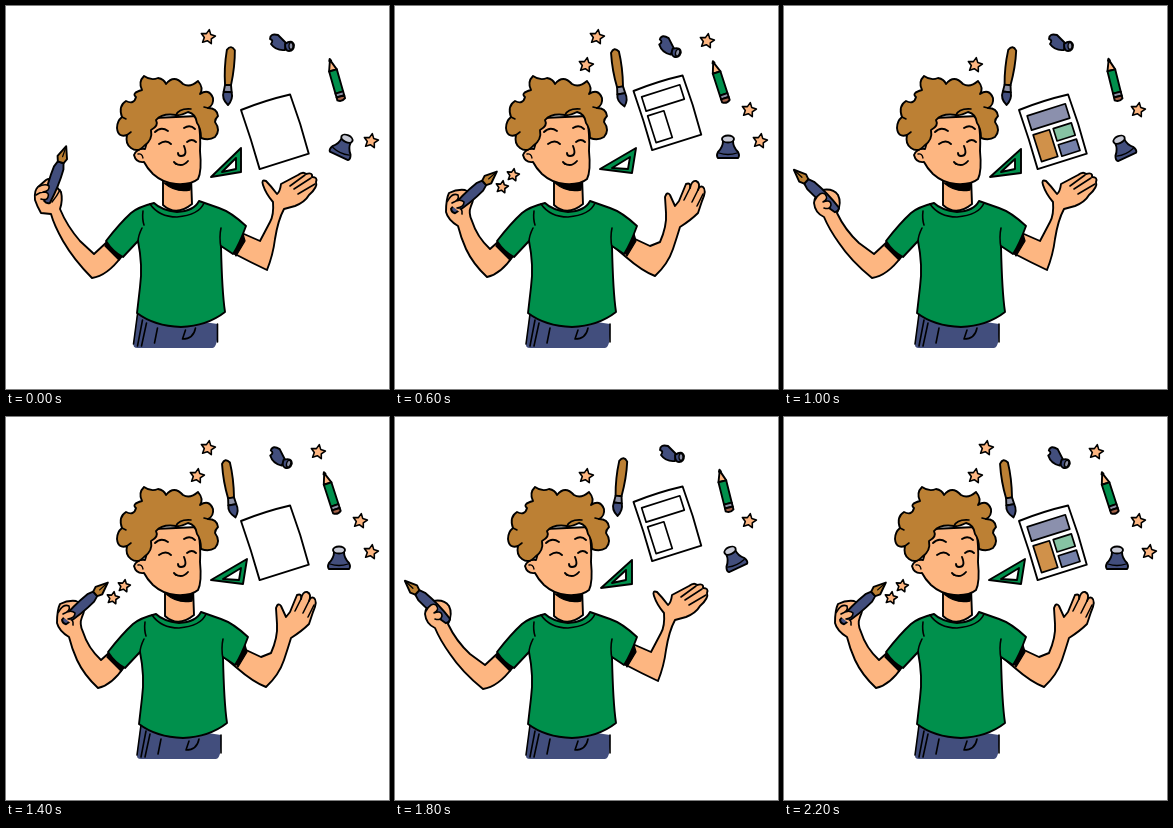
Write an HTML page that moves like this. It is 383 by 383 pixels and loops after 2.4 s.

```html
<!DOCTYPE html>
<html lang="en">
<head>
<meta charset="utf-8">
<title>Illustrator juggling tools</title>
<style>
html, body { margin: 0; width: 100%; height: 100%; overflow: hidden; background: #fff; }
svg { display: block; width: 100vw; height: 100vh; }
</style>
</head>
<body>
<svg id="stage" viewBox="0 0 383 383" stroke="#000" stroke-width="1.9" stroke-linejoin="round" stroke-linecap="round"></svg>
<script>
(() => {
const SKIN = '#fdb681', HAIR = '#bc8034', GREEN = '#00904c', NAVY = '#424e7d', GREY = '#8d90a4';
const STEP = 200, STEPS = 12;
const stage = document.getElementById('stage');

const shape = (d, fill = 'none', extra = '') => `<path d="${d}" fill="${fill}" ${extra}/>`;
const group = (x, y, angle, content) => `<g transform="translate(${x} ${y}) rotate(${angle})">${content}</g>`;
const thin = 'stroke-width="1.3"', fine = 'stroke-width="1.6"';

function star([x, y], r = 7.5, turn = 10) {
  let d = '';
  for (let i = 0; i < 10; i++) {
    const a = (turn - 90 + i * 36) * Math.PI / 180, q = i % 2 ? r * .5 : r;
    d += (i ? 'L' : 'M') + (x + q * Math.cos(a)).toFixed(1) + ' ' + (y + q * Math.sin(a)).toFixed(1);
  }
  return shape(d + 'Z', SKIN, fine);
}

// Left arms with the fist, and the fingers that lie over the pen
const upright = {
  arm: 'M118 250Q103 270 88 272Q70 254 59 235Q50 219 47 208L37 207Q33 200 31 194Q30 184 34 181L42 174Q47 171 49 177L57 186Q59 194 56 203Q63 220 76 235L90 248L104 235Z',
  pen: [43, 196, -71],
  fingers: 'M34 181Q41 177 45 180Q46 185 39 186Q46 186 44 191Q43 195 37 193M32 189Q36 186 40 186M56 184Q53 190 48 196'
};
const leftArms = {
  flat: upright,
  laugh: upright,
  out: {
    arm: 'M118 250Q103 270 88 272Q67 255 55 237Q45 223 40 211Q31 207 30 197Q31 188 38 184Q49 182 54 189Q58 197 53 207Q61 224 75 237L90 248L104 235Z',
    pen: [53, 204, -137],
    fingers: 'M31 194Q36 185 41 188Q45 193 39 196Q47 193 47 199Q46 204 40 202'
  },
  up: {
    arm: 'M118 250Q106 268 92 271Q78 258 71 243Q66 232 63 220Q53 214 51 206Q51 193 54 187Q62 183 70 184L76 187Q80 192 76 200Q73 207 77 215Q82 231 95 243L104 235Z',
    pen: [58, 205, -42],
    fingers: 'M52 196Q57 186 63 189Q65 194 57 197Q65 192 69 196Q69 201 62 202Q68 202 67 208'
  }
};

const rightArms = {
  flat: {
    arm: 'M218 238L229 247Q246 256 263 264Q269 249 271 233Q274 214 280 203L291 200Q301 196 305 189Q314 181 312 176Q314 171 308 171Q309 166 302 168Q299 165 294 169L277 178Q276 186 273 188Q267 180 262 175Q257 173 259 179Q262 188 269 196Q270 209 266 216L256 235L240 228Z',
    lines: 'M307 172L290 183M301 169L286 180M311 178L294 188'
  },
  laugh: {
    arm: 'M218 240L229 250Q243 267 257 274Q272 259 283 243Q295 228 301 218Q309 213 311 205L315 187Q313 182 309 188L306 197Q308 185 304 184Q300 183 299 196Q298 188 294 190Q291 193 292 203L289 192Q286 190 285 195L284 208Q286 214 279 220L257 246L241 233Z',
    lines: 'M306 197L304 203M299 196L300 203M292 202Q291 207 287 210'
  },
  up: {
    arm: 'M218 240L231 251Q247 265 260 270Q273 258 278 243Q282 231 285 221Q296 214 303 207L307 195Q312 184 308 181Q305 179 303 184Q306 177 301 175Q297 174 295 182Q296 176 291 178L284 195L280 200L275 189Q272 185 270 191L271 207Q272 220 265 236L255 240L240 233Z',
    lines: 'M303 184L297 196M295 182L289 194M308 188L302 200'
  }
};
rightArms.out = rightArms.flat;

function pen(x, y, angle) {
  return group(x, y, angle,
    shape('M0 -3Q18 -6 36 -5L42 -3V3L36 5Q18 6 0 3Q-2 0 0 -3Z', NAVY) +
    shape('M42 -3L47 -5L59 0L47 5L42 3Z', HAIR) + shape('M48 0H58', 'none', thin));
}

const flash = shape('M41 135L49 139M39 155L47 156M53 137L49 149M54 143L48 160M66 148L72 142L70 153M62 160L71 153M66 160L57 180M48 162L44 174', 'none', fine);

function leftArm(pose) {
  const a = leftArms[pose];
  return shape(a.arm, SKIN) + pen(...a.pen) + shape(a.fingers, SKIN, fine) +
    (pose === 'laugh' ? flash : '') +
    (pose === 'up' ? star([118, 169], 6.5) + star([107, 181], 6.5) : '') +
    shape('M103 236L118 250L115 254L101 240Z', '#000', thin);
}

function rightArm(pose) {
  const a = rightArms[pose];
  return shape(a.arm, SKIN) + shape(a.lines, 'none', fine) +
    shape('M229 245L239 228L241 235L232 250Z', '#000', thin);
}

const jeans = shape('M135 306L131 337Q130 342 135 342L210 342Q216 341 215 318Z', NAVY, 'stroke="none"') +
  shape('M135 308L131 338M140 314L135 340M144 317L139 340M155 322L152 337M183 324L180 333Q191 333 193 322M215 318L215 336', 'none', fine);

const shirt = shape('M150 197Q134 201 127 207Q116 217 102 235Q109 246 119 251L134 235Q139 260 136 281L133 307Q150 320 177 321Q203 320 221 306Q218 286 217 240L229 248Q235 239 242 220Q227 206 215 202L195 195Q190 205 173 206Q157 204 150 197Z', GREEN) +
  shape('M146 198Q155 211 173 211Q195 209 200 197M134 236Q134 230 138 222M139 205Q138 213 140 219M217 242Q215 231 217 222', 'none', fine);

const neck = shape('M159 168L159 199Q172 211 188 198L187 170Z', SKIN) +
  shape('M160 177Q175 181 187 176L186 184Q172 187 160 177Z', '#000', thin);

const skull = shape('M150 112L194 110Q197 130 196 145Q198 165 194 173Q187 179 172 178Q159 177 149 168Q143 162 140 156Q132 157 130 149Q133 142 141 143Z', SKIN);
const hair = shape('M140 140Q134 147 127 142Q121 138 123 129Q114 132 113 122Q113 115 118 111Q114 100 122 95Q130 99 132 91Q127 87 138 84Q134 76 140 70Q147 75 154 72Q160 73 162 78Q170 68 179 78Q186 82 194 75Q200 82 196 88Q205 82 209 92Q210 99 204 102Q213 102 214 110Q211 113 211 116Q217 124 211 131Q205 135 197 132Q197 122 193 117Q192 108 184 106Q176 110 172 109Q158 107 152 114Q155 120 147 124Q149 134 140 140Z', HAIR) +
  shape('M172 109Q175 102 187 103M123 129L127 126M118 111L122 113M204 102L200 101', 'none', fine) +
  shape('M134 148Q138 147 139 152', 'none', thin);

const nose = 'M180 140Q184 150 177 150Q174 150 174 147';
const calmFace = shape(nose + 'M151 126Q157 120 164 125M180 122Q186 118 191 123M155 138Q162 133 167 138M183 136Q188 132 192 136M171 157Q178 162 184 155M170 156L172 158');
const laughFace = shape('M167 152Q178 155 186 150Q186 164 181 167Q172 168 167 152Z', '#fff') +
  shape('M170 158Q178 161 185 157Q184 167 179 167Q173 165 170 158Z', '#000', thin) +
  shape('M174 164Q179 160 183 163Q181 167 178 166Z', '#d87a5c', 'stroke="none"') +
  shape(nose + 'M153 126Q158 121 164 125M180 123Q186 118 190 123M156 139Q162 131 167 137M182 136Q187 130 191 135');

// Page: blank, heading, then panels, then colour
function paper(phase) {
  const low = phase < 2 || phase > 4;
  const panels = [[6, 8, 40, 15, '#8b90ad'], [6, 28, 17, 28, '#d0914a'], [27, 28, 19, 13, '#86c3a3'], [27, 45, 19, 12, '#7480a8']];
  const count = [0, 0, 1, 2, 4, 4][phase];
  return group(low ? 235 : 238.5, low ? 104 : 85, -17.5,
    shape('M0 0Q26 -2 51.5 0Q53 31 51.5 62H0Q1 31 0 0Z', '#fff') +
    panels.slice(0, count).map(([x, y, w, h, c]) =>
      `<rect x="${x}" y="${y}" width="${w}" height="${h}" fill="${phase === 5 ? c : '#fff'}" stroke-width="1.7"/>`).join(''));
}

const brush = shape('M-3 -26Q1 -32 5 -26Q6 -10 3 9H-3Q-5 -8 -3 -26Z', HAIR) +
  shape('M-3 9H3L4 16H-4Z', GREY) + shape('M-4 16Q-6 23 1 29Q6 23 4 16Z', NAVY);
const pencil = shape('M-4 -11L0 -22L4 -11Z', SKIN) + shape('M-4 -11H4V12H-4Z', GREEN) +
  shape('M-1 -21L0 -23L1 -21Z', '#000') + shape('M-4 12H4V16H-4Z', GREY) + shape('M-4 16H4V19Q0 22 -4 19Z', '#a5634a');
const tube = shape('M-12 -4Q-12 -10 -4 -8Q-1 -5 4 0L3 7Q-6 8 -11 1Q-8 -3 -12 -4Z', NAVY) +
  shape('M3 1Q10 -4 12 2Q12 8 7 8Q3 8 3 1Z', NAVY) + '<ellipse cx="9" cy="3" rx="2" ry="3.5" fill="#8d90a4" stroke-width="1.3"/>';
const inkpot = shape('M-5 -5Q-5 1 -10 6Q-12 10 -10 12H10Q12 10 10 6Q5 1 5 -5Z', NAVY) +
  '<ellipse cy="-7" rx="6" ry="3.5" fill="#c6c8d4"/>' + shape('M-9 7Q0 10 9 7', 'none', thin);

// x, y, angle of each floating tool
const toolPoses = {
  left: { brush: [222.5, 70, 3], tube: [276, 37, 0], pencil: [330, 75, -16], inkpot: [338, 139, 25], square: 'M205 171L235 142L235 166ZM216 166L230 152L230 163Z' },
  mid: { brush: [224.5, 70, 6], tube: [277, 37, 0], pencil: [330, 75, -14], inkpot: [338, 140, -25], square: 'M206 171L237 143L237 167ZM217 166L231 153L231 163Z' },
  right: { brush: [223.5, 72, -10], tube: [275, 41, 18], pencil: [325, 77, -18], inkpot: [333, 140, 0], square: 'M205 163L241 142L237 167ZM217 162L235 151L233 163Z' }
};
function tools(key) {
  const p = toolPoses[key];
  return group(...p.brush, brush) + group(...p.tube, tube) + group(...p.pencil, pencil) +
    group(...p.inkpot, inkpot) + shape(p.square, GREEN, 'fill-rule="evenodd"');
}

const outer = [[202, 31], [365, 135]], inner = [[191, 59], [354, 104]], upper = [[312, 35]];
const starSets = { o: outer, i: inner, a: [...outer, ...inner, ...upper] };
const starOrder = 'oooaiiiaoiia';
const poses = ['flat', 'out', 'laugh', 'up'];
const headShift = [-2, -1, 0, -2, 1, 0, 0, -2, 0, 0, 0, -2];

function draw(step) {
  const pose = poses[step % 4];
  const toolPose = pose === 'up' ? 'right' : step % 8 ? 'mid' : 'left';
  const sway = step === 0 ? -2 : step === 8 ? -1 : 0;
  stage.innerHTML =
    group(sway, 0, 0, group(sway ? -1.5 : 0, 0, 0, jeans) + leftArm(pose) + rightArm(pose) + neck + shirt) +
    group(headShift[step], 0, 0, skull + (pose === 'laugh' ? laughFace : calmFace) + hair) +
    paper(step % 6) + tools(toolPose) + starSets[starOrder[step]].map(p => star(p)).join('');
}

let shown = -1;
function tick() {
  const step = Math.floor(performance.now() / STEP) % STEPS;
  if (step !== shown) draw(shown = step);
  requestAnimationFrame(tick);
}
tick();
})();
</script>
</body>
</html>
```
